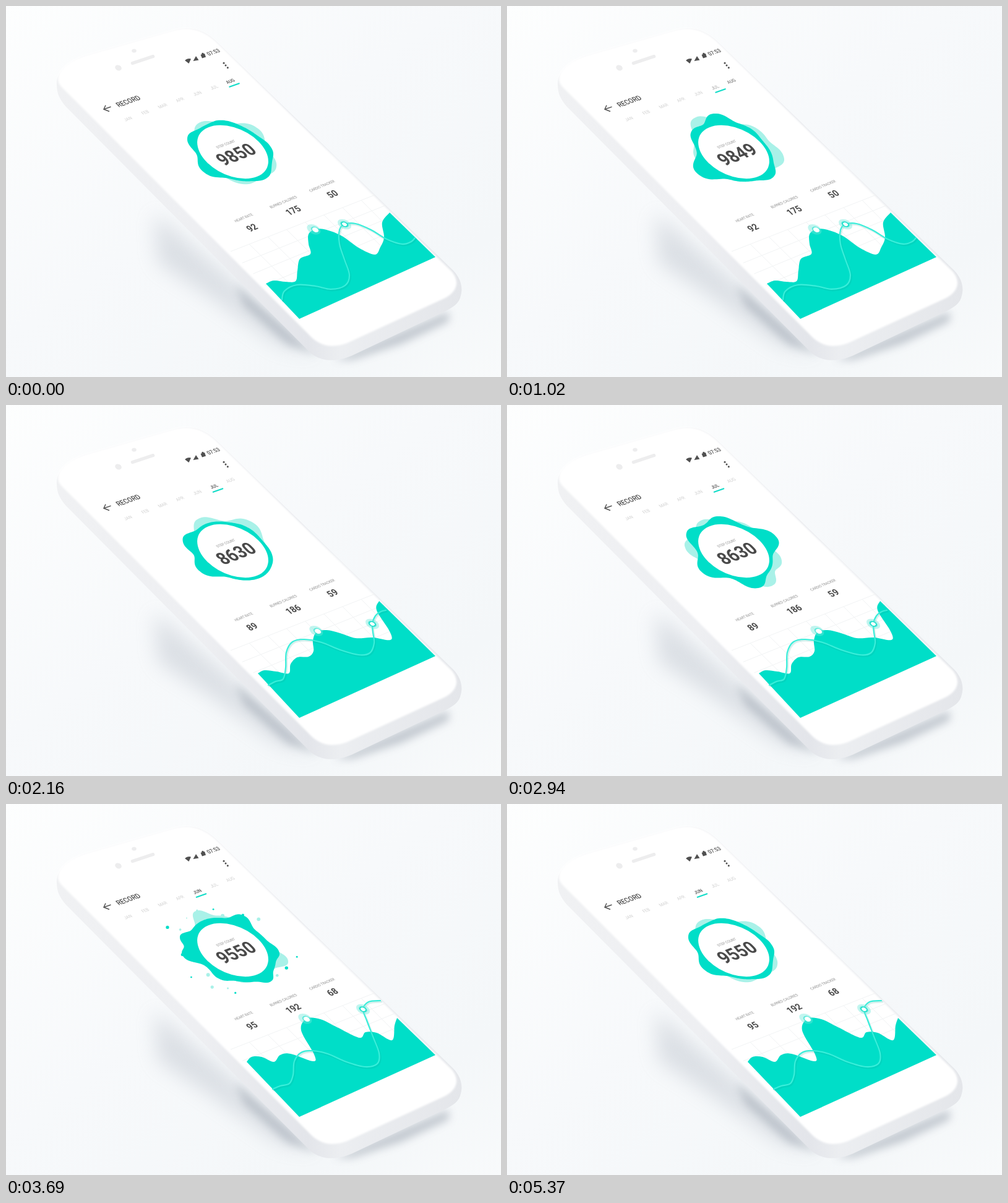
Write an HTML page that moves like this. It is 800 px wide and 600 px high and loops after 5400 ms.

```html
<!DOCTYPE html>
<html lang="en">
<head>
<meta charset="utf-8">
<title>Step record</title>
<style>
html, body { margin: 0; width: 100%; height: 100%; overflow: hidden; background: #f7f9fb; }
svg { display: block; width: 800px; height: 600px; }
text { font-family: Roboto, "Open Sans", sans-serif; text-anchor: middle; }
</style>
</head>
<body>
<svg id="stage" viewBox="0 0 800 600" xmlns="http://www.w3.org/2000/svg">
  <defs>
    <linearGradient id="sky" x1="0" y1="0" x2="1" y2="1">
      <stop offset="0" stop-color="#fdfefe"/><stop offset=".45" stop-color="#f7f9fb"/>
      <stop offset=".8" stop-color="#f4f7f9"/><stop offset="1" stop-color="#f8fafb"/>
    </linearGradient>
    <linearGradient id="side" gradientUnits="userSpaceOnUse" x1="82" y1="0" x2="736" y2="0">
      <stop offset="0" stop-color="#f0f1f3"/><stop offset=".35" stop-color="#eeeff2"/>
      <stop offset=".62" stop-color="#e3e5ea"/><stop offset=".7" stop-color="#eceef1"/>
      <stop offset="1" stop-color="#e4e6ea"/>
    </linearGradient>
    <filter id="soft" x="-50%" y="-50%" width="200%" height="200%"><feGaussianBlur stdDeviation="16"/></filter>
    <filter id="near" x="-50%" y="-50%" width="200%" height="200%"><feGaussianBlur stdDeviation="7"/></filter>
    <filter id="rim" x="-10%" y="-10%" width="120%" height="120%"><feGaussianBlur stdDeviation="1.5"/></filter>
  </defs>
  <rect width="800" height="600" fill="url(#sky)"/>
  <path d="M240 335L500 560L440 548L330 470L245 415Z" fill="#8d97a6" opacity=".26" filter="url(#soft)"/>
  <path d="M370 450L505 566L455 548L385 485Z" fill="#7d8796" opacity=".36" filter="url(#near)"/>
  <path d="M530 572L715 494L716 510L640 546L560 572Z" fill="#7d8796" opacity=".42" filter="url(#near)"/>
  <path d="M82 128C80 108 100 90 128 80L272 39C300 31 322 40 340 57L722 427C737 442 738 458 735 468C733 481 722 488 705 496L560 565C535 576 510 576 492 561L98 164C86 151 82 140 82 128Z" fill="url(#side)"/>
  <path d="M84 118C84 101 104 87 130 79L270 39C298 31 320 40 338 56L718 427C734 443 731 462 708 473L556 543C535 553 512 553 494 536L102 143C91 132 84 127 84 118Z" fill="#fff" filter="url(#rim)"/>
  <path d="M88 118C89 103 108 90 133 82L272 42C297 35 317 43 334 58L714 427C729 443 726 460 705 470L554 540C535 549 514 549 497 533L105 141C94 130 88 125 88 118Z" fill="#fff"/>
  <g fill="#ededee">
    <path d="M204.500 92.500L237.500 81.500" stroke="#ededee" stroke-width="5.500" stroke-linecap="round"/>
    <ellipse cx="181.500" cy="100" rx="5.500" ry="4.300" transform="rotate(25 181.500 100)"/>
    <ellipse cx="207" cy="72.500" rx="3.800" ry="3"/>
  </g>
  <g fill="#505050">
    <path d="M289 88Q293 84 299 85.500L295.500 93Z"/>
    <path d="M302.500 89L307 81L311.500 87.500Z"/>
    <path d="M314.500 79L316.500 78L316 76.500L318.500 75.500L319.500 77L321 77L323 82.500L317 84.500Z"/>
    <circle cx="352" cy="92.300" r="1.500"/><circle cx="355" cy="96" r="1.500"/><circle cx="358.300" cy="99.700" r="1.500"/>
  </g>
  <path d="M169.500 163L158 167M161 160.500L158 167L167 170.500" fill="none" stroke="#555" stroke-width="1.500"/>
  <g id="grid" fill="none" stroke="#f1f3f4" stroke-width="1"></g>
  <g id="chart"></g>
  <g id="badge"></g>
  <g id="labels"></g>
</svg>
<script>
const LOOP = 5400, TEAL = '#00dec8', PALE = '#a9f1e8';
const CENTER = [366.5, 236], U = [45.8, -18.3], V = [43.2, 43.7];
const $ = id => document.getElementById(id);

function add(parent, tag, attrs, text) {
  const el = document.createElementNS('http://www.w3.org/2000/svg', tag);
  set(el, attrs);
  if (text) el.textContent = text;
  return parent.appendChild(el);
}
function set(el, attrs) {
  for (const key in attrs) el.setAttribute(key, attrs[key]);
}

const clamp = x => Math.min(1, Math.max(0, x));
const lerp = (a, b, p) => a + (b - a) * p;
const mix = (a, b, p) => a.map((v, i) => lerp(v, b[i], p));
const progress = (t, start, span) => clamp((t - start) / span);
const smooth = p => p * p * (3 - 2 * p);
const easeOut = p => 1 - (1 - p) ** 2;
const easeInOut = p => p < .5 ? 4 * p ** 3 : 1 - 4 * (1 - p) ** 3;

// Unit circle of the tilted screen plane to stage coordinates, and back.
const project = (a, b) => [CENTER[0] + a * U[0] + b * V[0], CENTER[1] + a * U[1] + b * V[1]];
function unproject(x, y) {
  const dx = x - CENTER[0], dy = y - CENTER[1], det = U[0] * V[1] - U[1] * V[0];
  return [(V[1] * dx - V[0] * dy) / det, (U[0] * dy - U[1] * dx) / det];
}
const tilt = (x, y) => `matrix(${[...U, ...V, x, y]})`;

// Text centred on a point; rows get steeper towards the near end of the phone.
function label(text, x, y, size, fill, weight = 400) {
  const slope = .318 + .00019 * (x * .42 + y);
  return add($('labels'), 'text', {
    transform: `matrix(.93,${-.93 * slope},.876,.886,${x},${y})`,
    y: size * .355, 'font-size': size, 'font-weight': weight, fill
  }, text);
}

function curve(flat) {
  const n = flat.length / 2;
  const at = i => { i = Math.min(n - 1, Math.max(0, i)) * 2; return [flat[i], flat[i + 1]]; };
  let d = 'M' + at(0);
  for (let i = 0; i < n - 1; i++) {
    const [p, q, r, s] = [at(i - 1), at(i), at(i + 1), at(i + 2)];
    d += `C${q.map((v, k) => v + (r[k] - p[k]) / 6)} ${r.map((v, k) => v - (s[k] - q[k]) / 6)} ${r}`;
  }
  return d;
}

// Chart, one row of points per month: August, July, June.
const HILLS = [
  [420,449, 433,444, 452,446, 468,445, 471,428, 475,409, 492,401, 489,385, 489,369, 500,361, 518,362, 543,372, 570,391, 596,402, 605,390, 611,374, 608,350, 620,334],
  [407,434, 418,429, 437,431, 457,434, 460,419, 471,408, 489,407, 497,398, 496,381, 502,367, 518,364, 540,369, 565,377, 592,376, 621,380, 620,366, 599,332, 603,317],
  [389,417, 397,409, 413,409, 433,417, 443,406, 460,404, 496,416, 498,405, 477,366, 486,347, 508,348, 535,361, 571,378, 581,369, 599,370, 624,382, 628,358, 632,346]
];
const LINES = [
  [446,475, 450,461, 470,451, 500,453, 525,458, 548,452, 555,435, 547,410, 539,385, 539,362, 547,353, 565,352, 590,362, 615,377, 640,385, 655,381, 661,375],
  [424,453, 436,447, 448,443, 452,425, 453,400, 463,383, 482,379, 510,384, 540,396, 570,404, 588,401, 595,385, 593,368, 592,354, 597,341, 606,334, 614,332],
  [431,461, 443,456, 458,452, 464,438, 466,416, 477,402, 495,399, 520,404, 550,417, 580,425, 600,420, 603,403, 593,376, 583,350, 577,332, 586,320, 605,318]
];
const DOTS = [[500,362, 547,353], [504,366, 592,354], [486,348, 577,332]];
const COUNTS = [[9850, 92, 175, 50], [8630, 89, 186, 59], [9550, 95, 192, 68]];

const byMonth = (rows, stage) =>
  stage <= 1 ? mix(rows[0], rows[1], stage) : mix(rows[1], rows[2], stage - 1);

const [nearL, nearR, farL, farR] = [[474, 506], [694, 406], [363, 397], [595, 306]];
for (const f of [.5, .67, .83, 1])
  add($('grid'), 'path', { d: `M${mix(nearL, farL, f)}L${mix(nearR, farR, f)}` });
for (let i = 1; i < 8; i++)
  add($('grid'), 'path', { d: `M${mix(nearL, nearR, i * .13)}L${mix(farL, farR, i * .13)}` });

const hill = add($('chart'), 'path', { fill: TEAL });
const stroke = (color, width, opacity) => add($('chart'), 'path', {
  fill: 'none', stroke: color, 'stroke-width': width, opacity, 'stroke-linecap': 'round'
});
const lineShade = stroke('#009f92', 3, .16);
set(lineShade, { transform: 'translate(1.500 2)' });
const line = stroke('#3aeeda', 2.2, 1);
const dots = [0, 1].map(outlined => {
  const g = add($('chart'), 'g');
  const shift = outlined ? 0 : -.03;
  add(g, 'circle', { cx: shift, cy: shift, r: .175, fill: '#6be8da', opacity: .42 });
  add(g, 'circle', { r: .115, fill: '#35e6d3', opacity: outlined ? .45 : .7 });
  add(g, 'circle', {
    r: .077, fill: '#fff', stroke: outlined ? '#12dfca' : '#fff', 'stroke-width': outlined ? .03 : .01
  });
  return g;
});

// Blob shapes: base radius, lobe width, then lobe tips on the stage.
const TEAL_SHAPES = {
  idle:   [1, .34, 293,214, 352,185, 390,199, 428,228, 422,278, 370,281, 320,269],
  six:    [1, .34, 290,207, 343,180, 385,196, 434,212, 405,296, 370,282, 317,272],
  pulse:  [1, .34, 298,203, 336,174, 390,196, 428,240, 431,276, 362,281, 309,272],
  splash: [1.1, .22, 281,216, 318,192, 383,180, 441,238, 428,287, 345,283, 286,246],
  burst:  [1.1, .3, 278,212, 345,186, 400,197, 438,243, 428,275, 375,287, 325,274],
  calm:   [1, .34, 286,220, 345,190, 390,198, 430,243, 410,279, 370,281, 313,269]
};
const PALE_SHAPES = {
  idle:   [1, .36, 312,189, 404,196, 437,260, 383,288, 310,240],
  six:    [1, .34, 313,187, 385,192, 444,252, 429,292, 288,231],
  pulse:  [1, .38, 303,181, 405,199, 447,243, 380,284, 307,250],
  splash: [1.08, .24, 307,173, 350,181, 456,254, 385,289, 305,245],
  burst:  [1.08, .36, 310,194, 400,180, 437,262, 360,291, 305,245],
  calm:   [1, .38, 312,183, 396,189, 430,247, 385,282, 305,240]
};
const POSES = [
  [0, 'idle'], [722, 'six'], [1020, 'pulse'], [1472, 'splash'], [1530, 'burst'], [2252, 'calm'],
  [2940, 'six'], [3238, 'pulse'], [3690, 'splash'], [3748, 'burst'], [4470, 'calm'], [5370, 'idle'], [LOOP, 'idle']
];

function blob(shapes, t) {
  let i = 0;
  while (t >= POSES[i + 1][0]) i++;
  const [from, a] = POSES[i], [to, b] = POSES[i + 1];
  const [base, width, ...tips] = mix(shapes[a], shapes[b], smooth(progress(t, from, to - from)));
  const lobes = [];
  for (let k = 0; k < tips.length; k += 2) {
    const [x, y] = unproject(tips[k], tips[k + 1]);
    lobes.push([Math.atan2(y, x), Math.max(0, Math.hypot(x, y) - base)]);
  }
  const points = [];
  for (let k = 0; k < 180; k++) {
    const angle = k * Math.PI / 90;
    let r = base;
    for (const [mid, height] of lobes) {
      const gap = Math.atan2(Math.sin(angle - mid), Math.cos(angle - mid));
      r += height * Math.exp(-Math.pow(Math.abs(gap) / width, 2.6));
    }
    points.push(project(r * Math.cos(angle), r * Math.sin(angle)).map(v => v.toFixed(2)));
  }
  return 'M' + points.join('L') + 'Z';
}

// Droplets: x, y, radius, pale flag, as placed partway through the burst.
const DROPS = [
  [254,197,2.6,0], [280,244,2.6,0], [295,283,1.4,0], [331,300,2.6,1], [371,310,1.6,0], [358,302,1.5,1],
  [324,279,3,1], [276,201,1.8,1], [287,181,1,1], [305,168,1.6,1], [333,166,1.4,0], [349,177,3,1],
  [384,176,2.1,0], [411,183,2.9,1], [453,250,3,1], [459,267,2.7,0], [477,248,1.4,0], [443,280,2.3,1]
];
const badge = $('badge');
const drops = DROPS.map(([, , r, pale]) => add(badge, 'circle', { r, fill: pale ? PALE : TEAL }));
add(badge, 'circle', {
  transform: tilt(CENTER[0] + 2, CENTER[1] + 5), r: 1.02, fill: TEAL, opacity: .16, filter: 'url(#near)'
});
const paleBlob = add(badge, 'path', { fill: PALE });
const tealBlob = add(badge, 'path', { fill: TEAL });
add(badge, 'circle', { transform: tilt(...CENTER), r: .912, fill: '#fff' });

label('07:53', 335, 74.5, 8, '#505050', 500);
label('RECORD', 197.5, 154, 10.3, '#505050', 500);
label('STEP COUNT', 355, 223.5, 5.3, '#8f8f8f');
label('HEART RATE', 384, 342.5, 5.3, '#8a8a8a');
label('BURNED CALORIES', 448, 317, 5.3, '#8a8a8a');
label('CARDIO TRACKER', 510.5, 291, 5.3, '#8a8a8a');
const counters = [
  label('9850', 371.5, 240, 26, '#4a4a4a', 700),
  label('92', 397.5, 358.5, 13, '#4a4a4a', 700),
  label('175', 464, 330.5, 13, '#4a4a4a', 700),
  label('50', 527.5, 304, 13, '#4a4a4a', 700)
];

label('JAN', 197, 182.5, 6.5, '#cfcfcf');
label('FEB', 225, 172, 6.5, '#cfcfcf');
label('MAR', 253, 161.5, 6.5, '#cfcfcf');
label('APR', 281, 151.5, 6.5, '#cfcfcf');
const TABS = [[362.5, 121.5], [336, 131.5], [309, 141.5]];
const tabs = ['AUG', 'JUL', 'JUN'].map((name, i) => label(name, ...TABS[i], 6.8, '#cfcfcf'));
const underline = add($('labels'), 'path', { d: 'M-8.500 3L8.500 -3', stroke: '#12dcc8', 'stroke-width': 2 });

const SECOND = 2218;
const twoSteps = (t, start, span, ease) =>
  ease(progress(t, start, span)) + ease(progress(t, start + SECOND, span));

function drawDrops(t) {
  const p = (t - (t < 3418 ? 1200 : 3418)) / 930;
  const visible = p > 0 && p < 1;
  const spread = (147 - 84 * (1 - p) ** 2) / 112;
  drops.forEach((drop, i) => set(drop, {
    cx: lerp(CENTER[0], DROPS[i][0], spread),
    cy: lerp(CENTER[1], DROPS[i][1], spread),
    opacity: visible ? clamp((1 - p) / .45) : 0
  }));
}

function draw(t) {
  const stage = twoSteps(t, 990, 470, easeInOut);
  set(hill, { d: curve(byMonth(HILLS, stage)) + `L${nearR}L${nearL}Z` });
  const d = curve(byMonth(LINES, stage));
  set(line, { d });
  set(lineShade, { d });
  const at = byMonth(DOTS, stage);
  dots.forEach((dot, i) => set(dot, { transform: tilt(at[2 * i], at[2 * i + 1]) }));
  byMonth(COUNTS, stage).forEach((value, i) => { counters[i].textContent = Math.round(value); });

  const [x, y] = byMonth(TABS, twoSteps(t, 780, 350, easeOut));
  set(underline, { transform: `translate(${x + 6.5} ${y + 6.5})` });
  const active = twoSteps(t, 960, 160, p => p);
  tabs.forEach((tab, i) => {
    const grey = Math.round(lerp(207, 80, clamp(1 - Math.abs(active - i))));
    set(tab, { fill: `rgb(${grey},${grey},${grey})`, 'font-weight': Math.round(active) === i ? 500 : 400 });
  });

  set(paleBlob, { d: blob(PALE_SHAPES, t) });
  set(tealBlob, { d: blob(TEAL_SHAPES, t) });
  drawDrops(t);
}

const began = performance.now();
function frame() {
  draw((performance.now() - began) % LOOP);
  requestAnimationFrame(frame);
}
frame();
</script>
</body>
</html>
```
